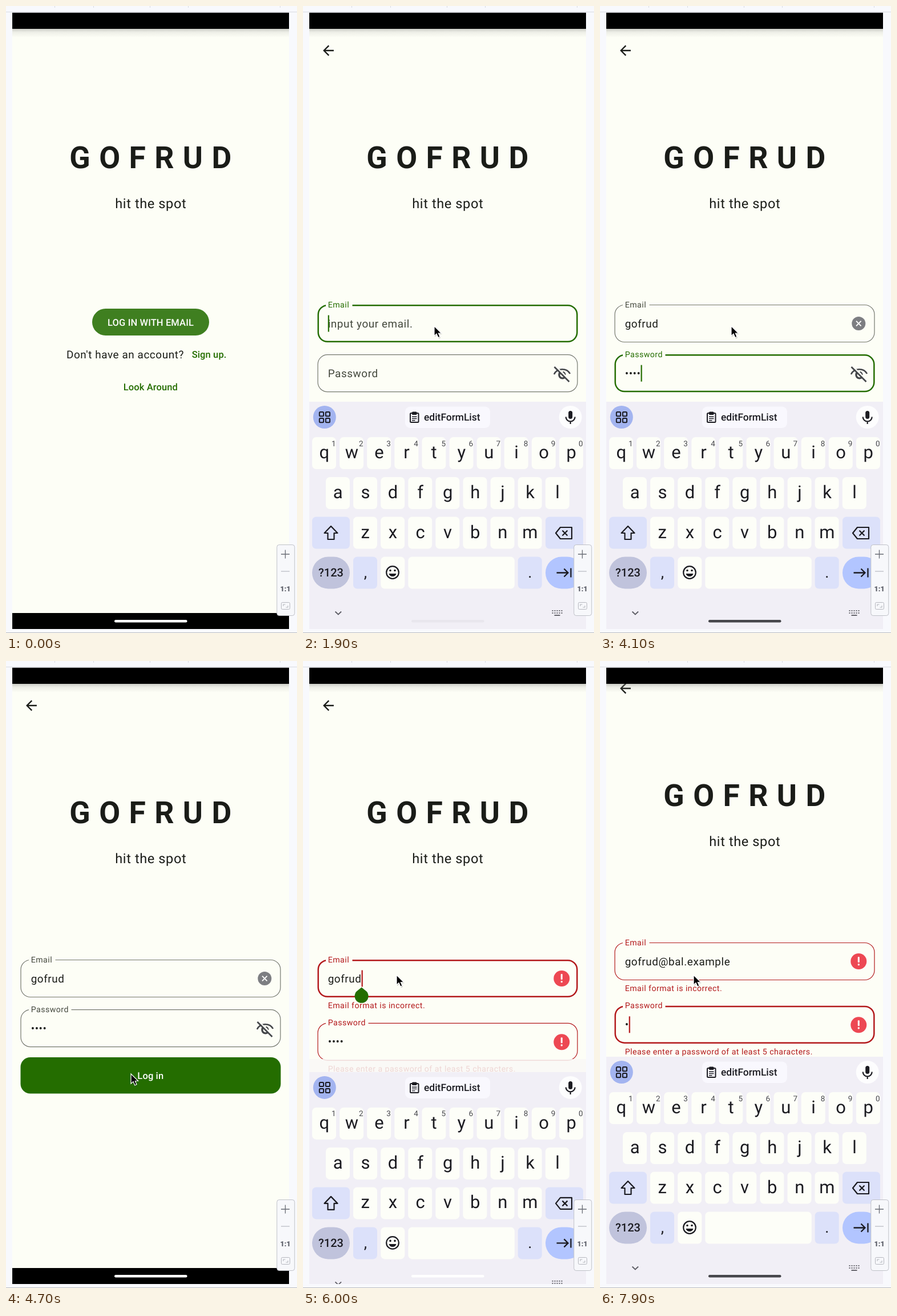
Recreate the animation shown at these times as an HTML page. Size 510 by 1098 pixels, loop 8 s.

```html
<!DOCTYPE html>
<html lang="en">
<head>
<meta charset="utf-8">
<title>Sign in</title>
<style>
html, body { margin: 0; width: 100%; height: 100%; overflow: hidden; background: #f8f9fd; }
svg { display: block; width: 100%; height: 100%; font-family: Roboto, sans-serif; text-rendering: geometricPrecision; }
</style>
</head>
<body>
<svg id="stage" viewBox="0 0 510 1098" xmlns="http://www.w3.org/2000/svg"></svg>
<script>
const LOOP = 8000, STEP = 100;
const BG = '#fdfef6', INK = '#1a1c18', SOFT = '#44483e', GREEN = '#246d00', RED = '#b3191c';
const KEYBOARD = '#f1eff6', KEY = '#fdfef8', TINT = '#dce1fa';
const BODY_SIZE = 18.86, SMALL_SIZE = 14.15, LABEL_SIZE = 16.5;
const EMAIL = 'gofrud@bal.example';

// Number of characters present from each moment on
const emailSteps = [[0, 0], [2000, 1], [2100, 2], [2200, 3], [2300, 4], [2400, 6], [6200, 7], [6400, 8],
  [6600, 9], [6800, 11], [6900, 13], [7000, 15], [7100, 17], [7200, 18]];
const passSteps = [[0, 0], [3000, 1], [3100, 2], [3200, 3], [3300, 4], [3400, 5], [3500, 6],
  [3900, 5], [4000, 4], [7700, 3], [7800, 2], [7900, 1]];
const focusSteps = [[0, ''], [1900, 'email'], [2900, 'pass'], [4300, ''], [5700, 'email'], [7500, 'pass']];
const pointerPath = [[100, 121, 707], [400, 235, 400], [500, 270, 346], [700, 337, 470], [900, 318, 563],
  [1400, 318, 563], [1800, 230, 560.5], [4200, 230, 560.5], [4600, 219, 723], [5100, 219, 723],
  [5500, 190, 456], [5800, 164, 550]];

const clamp = v => Math.max(0, Math.min(1, v));
const lerp = (a, b, p) => a + (b - a) * p;
const valueAt = (steps, t) => steps.filter(s => s[0] <= t).pop()[1];

function pointerAt(t) {
  const i = pointerPath.findIndex(k => k[0] > t);
  if (i < 0) return pointerPath[pointerPath.length - 1].slice(1);
  const a = pointerPath[i - 1], b = pointerPath[i], p = (t - a[0]) / (b[0] - a[0]);
  return [lerp(a[1], b[1], p), lerp(a[2], b[2], p)];
}

// cubic-bezier(.4, 0, .2, 1)
function standardEase(x) {
  let lo = 0, hi = 1, s = 0.5;
  for (let i = 0; i < 20; i++) {
    s = (lo + hi) / 2;
    const u = 1 - s;
    if (1.2 * u * u * s + 0.6 * u * s * s + s * s * s < x) lo = s; else hi = s;
  }
  return s * s * (3 - 2 * s);
}

const rect = (x, y, w, h, fill, rx = 0, more = '') =>
  `<rect x="${x}" y="${y}" width="${w}" height="${h}" rx="${rx}" fill="${fill}" ${more}/>`;
const text = (x, y, size, str, fill = INK, more = '') =>
  `<text x="${x}" y="${y}" font-size="${size}" fill="${fill}" xml:space="preserve" ${more}>${str}</text>`;
const stroke = (d, color, width, more = '') =>
  `<path d="${d}" fill="none" stroke="${color}" stroke-width="${width}" ${more}/>`;
const MID = 'text-anchor="middle"';
const BODY = 'letter-spacing=".59"';
const SMALL = 'letter-spacing=".47"';
const LABEL = 'font-weight="500" letter-spacing=".12"';

const pen = document.createElement('canvas').getContext('2d');
function bodyWidth(str) {
  pen.font = `${BODY_SIZE}px Roboto, sans-serif`;
  pen.textRendering = 'geometricPrecision';
  return pen.measureText(str).width + str.length * 0.59;
}

function errorIcon(y) {
  return `<circle cx="453.3" cy="${y}" r="14" fill="#ed4853"/>` +
    rect(451.8, y - 8, 3, 10, '#fff', 1) + rect(451.8, y + 4, 3, 3.2, '#fff', 1);
}

function clearIcon(y) {
  return `<circle cx="453.3" cy="${y}" r="12" fill="#7d7e82"/>` +
    stroke(`M449 ${y - 4.3}l8.6 8.6m0 -8.6l-8.6 8.6`, '#fff', 1.9);
}

function eyeIcon(y) {
  const color = '#44464a';
  return `<g transform="translate(454 ${y})">` +
    stroke('M-14 0C-9 -11 8 -12 14 -1', color, 2.6) +
    stroke('M-3 -3.5A5.6 5.6 0 1 0 4.6 5.5', color, 3.4) +
    stroke('M1.5 -4.2A5.6 5.6 0 0 1 5.6 1', color, 2) +
    stroke('M-11 -14L14 11', BG, 2.4) + stroke('M-13.5 -13L12.5 13', color, 2.6) + '</g>';
}

// Outline drawn inside fixed bounds, so a thicker line grows inward
function outline(y, color, width) {
  const h = width / 2;
  return rect(25.4 + h, y - 0.6 + h, 456.2 - width, 66.2 - width, 'none', 17.5 - h,
    `stroke="${color}" stroke-width="${width}"`);
}

// One outlined text field; y is the top edge
function field({ y, name, value, hint, focused, error, lift, caret, icon }) {
  const accent = error ? RED : focused ? GREEN : '#74776f';
  const labelFill = error ? RED : focused ? GREEN : SOFT;
  let out = outline(y, accent, focused ? 2.5 : 1.2);
  if (lift > 0) out += rect(40, y - 3, name === 'Email' ? 46.5 : 74.5, 6, BG);
  out += text(43.7, lerp(y + 39, y + 4, lift), lerp(BODY_SIZE, SMALL_SIZE, lift), name, labelFill,
    `letter-spacing="${lerp(0.59, 0.47, lift)}"`);
  if (value) out += text(43.7, y + 39, BODY_SIZE, value, INK, BODY);
  else if (hint && focused) out += text(43.7, y + 39, BODY_SIZE, hint, SOFT, BODY);
  if (focused && caret) out += rect(43.7 + bodyWidth(value), y + 18, 2.2, 29, error ? RED : GREEN);
  return out + icon;
}

function form(t) {
  const focus = valueAt(focusSteps, t);
  const error = t >= 5000;
  const email = EMAIL.slice(0, valueAt(emailSteps, t));
  const pass = '•'.repeat(valueAt(passSteps, t));
  const caret = !(t >= 2700 && t < 2900);
  const passY = error ? 634.3 : 610.7;
  const loginY = error ? 741 : 694;
  let out = field({
    y: 523.5, name: 'Email', value: email, hint: 'input your email.', focused: focus === 'email',
    error, caret, lift: t >= 1900 ? 1 : 0, icon: error ? errorIcon(556) : email ? clearIcon(556) : ''
  });
  out += field({
    y: passY, name: 'Password', value: pass, focused: focus === 'pass',
    error, caret, lift: clamp((t - 2830) / 150), icon: error ? errorIcon(passY + 33) : eyeIcon(645)
  });
  if (error) {
    out += text(43.7, 608, SMALL_SIZE, 'Email format is incorrect.', RED, SMALL) +
      text(43.7, 719, SMALL_SIZE, 'Please enter a password of at least 5 characters.', RED, SMALL);
  }
  out += rect(25.5, loginY, 456, 63.5, GREEN, 17) +
    text(253.3, loginY + 38, LABEL_SIZE, 'Log in', '#fff', `${LABEL} ${MID}`);
  if (t >= 5800 && t < 6200) {
    out += `<path d="M102.6 571.5L111.2 578.5A12 12 0 1 1 94 578.5Z" fill="${GREEN}"/>`;
  }
  return out;
}

function welcome() {
  return rect(151, 530, 205, 47, 'url(#press)', 23.5) +
    text(253.5, 559.6, LABEL_SIZE, 'LOG IN WITH EMAIL', '#fff', `${LABEL} ${MID}`) +
    text(106, 617, BODY_SIZE, "Don't have an account?", INK, BODY) +
    text(325.7, 616.3, LABEL_SIZE, 'Sign up.', GREEN, LABEL) +
    text(253.3, 673, LABEL_SIZE, 'Look Around', GREEN, `${LABEL} ${MID}`);
}

function keyboard() {
  const dark = '#1b1b21', pitch = 48.1;
  let out = rect(11, 693, 485, 420, KEYBOARD);
  const key = (x, y, w, fill = KEY, rx = 7) => { out += rect(x, y, w, 56, fill, rx); };
  [['qwertyuiop', 16, 755], ['asdfghjkl', 40, 825], ['zxcvbnm', 88, 894.5]].forEach(([row, x0, y]) => {
    [...row].forEach((c, i) => {
      const x = x0 + i * pitch;
      key(x, y, 42);
      out += text(x + 21.3, y + 37, 31, c, dark, MID);
      if (y === 755) out += text(x + 37.8, y + 15.5, 13.5, (i + 1) % 10, '#46464d', MID);
    });
  });
  key(16, 894.5, 66, TINT);
  key(425, 894.5, 66, TINT);
  key(16, 964.5, 66, '#c0c3dc', 28);
  key(88, 964.5, 42, TINT);
  key(136.3, 964.5, 42);
  key(184.3, 964.5, 186.5);
  key(376.7, 964.5, 42, TINT);
  key(425, 964.5, 66, '#b2c5ff', 28);
  out += text(49, 999, 20, '?123', dark, `${MID} font-weight="500"`) +
    text(109.3, 1001, 27, ',', dark, MID) + text(397.7, 1001, 27, '.', dark, MID);
  // shift, delete, next
  out += stroke('M49 911L37.5 923H43.5V934H54.5V923H60.5Z', dark, 2.2, 'stroke-linejoin="round"') +
    stroke('M451 913H471V933H451L443 923Z', dark, 2.2, 'stroke-linejoin="round"') +
    stroke('M454.5 918.5l9 9m0 -9l-9 9', dark, 2.2) +
    stroke('M444.5 992.5H464M457.5 985.5l7 7l-7 7M469.5 984.5v16', dark, 2.3);
  // smiley
  out += `<circle cx="157" cy="992" r="10.8" fill="none" stroke="${dark}" stroke-width="2.2"/>` +
    `<circle cx="153" cy="988.5" r="1.8" fill="${dark}"/><circle cx="161" cy="988.5" r="1.8" fill="${dark}"/>` +
    `<path d="M150.5 994H163.5A6.7 6.7 0 0 1 150.5 994Z" fill="${dark}"/>`;
  // toolbar
  out += '<circle cx="37.8" cy="720" r="20" fill="#a3b4f0"/>';
  for (const x of [28.8, 39.8]) for (const y of [711, 722]) {
    out += rect(x, y, 7.2, 7.2, 'none', 1.5, `stroke="${dark}" stroke-width="2"`);
  }
  out += rect(179, 701.5, 149, 37.5, '#f9f8fe', 9) +
    rect(188, 713, 14.5, 16, 'none', 1.5, `stroke="${dark}" stroke-width="2"`) +
    rect(191, 710.5, 8.5, 5.5, dark, 1.5) +
    stroke('M191 719.3h8.5M191 722.5h8.5M191 725.7h5.5', dark, 1.4) +
    text(212, 726, 17.4, 'editFormList', dark, 'font-weight="500"') +
    '<circle cx="468.7" cy="720" r="20" fill="#fdfdfe"/>' +
    rect(465.2, 709, 7, 14, dark, 3.5) +
    stroke('M460.7 719.5a8 8 0 0 0 16 0M468.7 727.5v4.5', dark, 2.2);
  // bottom row
  out += stroke('M56.5 1060.5l5.3 5l5.3 -5', '#5c5c64', 1.8);
  for (let i = 0; i < 5; i++) {
    out += rect(436.5 + i * 4, 1058, 2, 2, '#66666d') + rect(436.5 + i * 4, 1062, 2, 2, '#66666d');
  }
  return out + rect(440.5, 1066, 10, 2, '#66666d');
}

function zoomPanel() {
  return rect(474.8, 943.5, 31, 124, '#f7f8fb', 4, 'stroke="#bfc1c8"') +
    stroke('M482 960h15M489.5 952.5v15', '#686b74', 1.3) +
    stroke('M482 990h15', '#bcbec6', 1.3) +
    text(489.7, 1025, 12.5, '1:1', '#5a5d66', `${MID} font-weight="800"`) +
    rect(482.5, 1044.5, 15, 12, 'none', 2, 'stroke="#b5b7be"') +
    stroke('M486 1051v-3h3.5M494 1050v3h-3.5', '#b5b7be', 1.1);
}

const stage = document.getElementById('stage');
stage.innerHTML = `
<defs>
  <linearGradient id="shade" x2="0" y2="1">
    <stop offset="0" stop-color="#8a8b86" stop-opacity=".42"/>
    <stop offset=".4" stop-color="#8a8b86" stop-opacity=".13"/>
    <stop offset="1" stop-color="#8a8b86" stop-opacity="0"/>
  </linearGradient>
  <linearGradient id="press">
    <stop id="pressEdge" offset="0" stop-color="#3f7f20"/>
    <stop offset=".45" stop-color="#3f7f20"/>
  </linearGradient>
  <clipPath id="screen"><rect x="11" y="11.5" width="485" height="1079.5"/></clipPath>
</defs>
${rect(0, 0, 510, 1098, '#f8f9fd')}
${stroke('M0 10.5H510M85.5 0v3M153.5 0v3M252.5 0v3M319.5 0v3M480.5 0v3', '#d9dbe1', 1)}
${stroke('M0 1097.5H510', '#b9bbc2', 1)}
<g clip-path="url(#screen)">
  ${rect(11, 12, 485, 1079, BG)}
  <g id="app">
    <path id="back" transform="translate(30.3 63.8) scale(1.18)" fill="${INK}" d="M20 11H7.8l5.6-5.6L12 4l-8 8 8 8 1.4-1.4L7.8 13H20z"/>
    ${text(261, 284, 53.5, 'GOFRUD', INK, `${MID} font-weight="700" letter-spacing="15.4"`)}
    ${text(253.8, 354, 23.58, 'hit the spot', INK, `${MID} ${BODY}`)}
    <g id="welcome">${welcome()}</g>
    <g id="form"></g>
  </g>
  ${rect(11, 40, 485, 15, 'url(#shade)')}
  ${rect(11, 11.5, 485, 28.5, '#000')}
  ${rect(11, 1063, 485, 28, '#000')}
  ${rect(11, 697, 485, 30, '#f9f8f6', 0, 'id="veil" opacity=".85"')}
  <g id="keys">${keyboard()}</g>
  ${rect(190, 1075, 127.5, 4.4, '#fff', 2.2, 'id="pill"')}
</g>
${zoomPanel()}
<g id="pointer">
  <path d="M1 2V19L5 15.5L8 22L11.2 20.7L8.4 14.3H13.8Z" fill="#000" opacity=".18"/>
  <path d="M0 0V17.2L4 13.6L6.8 20L10 18.7L7.3 12.5H12.6Z" fill="#000" stroke="#fff" stroke-width="1.2"/>
</g>`;

const $ = id => document.getElementById(id);
const show = (id, on) => $(id).setAttribute('display', on ? 'inline' : 'none');

function keyboardOffset(t) {
  if (t < 1900) return 400;
  if (t < 4300) return 0;
  if (t < 5700) return 400 * clamp((t - 4200) / 400) ** 2;
  return 420 * (1 - clamp((t - 5700) / 500)) ** 3;
}

function draw(t) {
  const fade = standardEase(clamp((t - 1118) / 700));
  show('back', t >= 1100);
  show('welcome', fade < 1);
  $('welcome').setAttribute('opacity', 1 - fade);
  $('pressEdge').setAttribute('stop-color', t >= 1000 ? '#29700a' : '#3f7f20');
  $('form').setAttribute('opacity', fade);
  $('form').innerHTML = fade > 0 ? form(t) : '';

  const scroll = 30 * (1 - (1 - clamp((t - 7400) / 400)) ** 2);
  $('app').setAttribute('transform', `translate(0 ${-scroll})`);

  const drop = keyboardOffset(t);
  show('keys', drop < 400);
  show('veil', t >= 5900 && t < 6100);
  $('keys').setAttribute('transform', `translate(0 ${drop})`);
  const settled = drop < 4 && t !== 1900;
  $('pill').setAttribute('fill', settled ? '#46464b' : t === 1900 ? '#e8e6ed' : '#fff');

  show('pointer', t >= 100);
  if (t >= 100) $('pointer').setAttribute('transform', `translate(${pointerAt(t)})`);
}

const start = performance.now();
let last = -1;
function tick() {
  const t = Math.floor(((performance.now() - start) % LOOP) / STEP) * STEP;
  if (t !== last) draw(last = t);
  requestAnimationFrame(tick);
}
tick();
</script>
</body>
</html>
```
